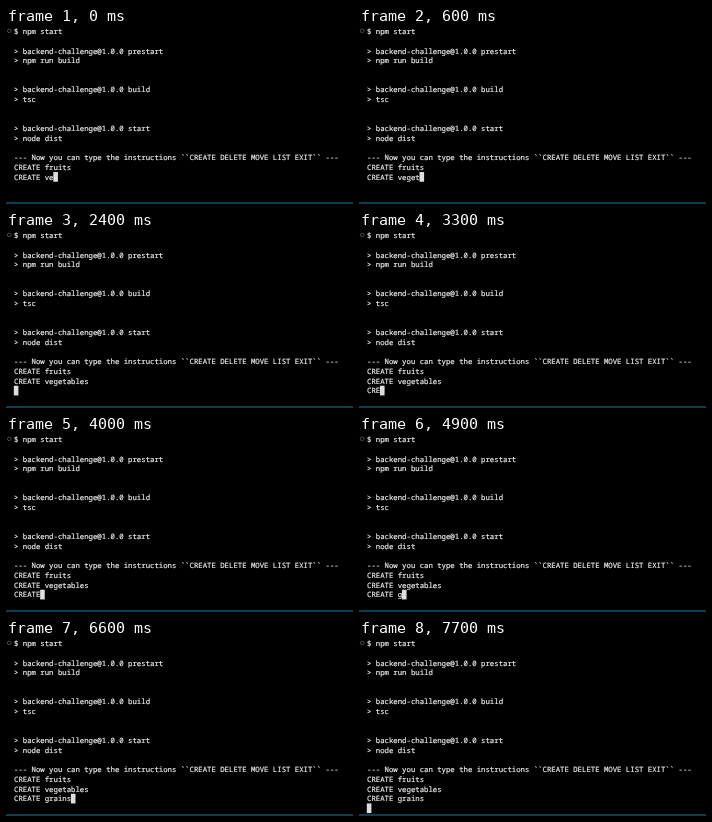
Animation of 347x176 px, one loop 8 s. Source, as an HTML page:

```html
<!DOCTYPE html>
<html lang="en">
<head>
<meta charset="utf-8">
<title>Terminal session</title>
<style>
  html, body { margin: 0; width: 100%; height: 100%; overflow: hidden; background: #000; }
  svg { display: block; }
  text {
    font: 7.32px "Noto Sans Mono", "DejaVu Sans Mono", monospace;
    fill: #ececec;
    stroke: #ececec;
    stroke-width: .2px;
    white-space: pre;
    text-rendering: geometricPrecision;
  }
</style>
</head>
<body>
<svg id="stage" width="347" height="176" viewBox="0 0 347 176">
  <rect width="347" height="176" fill="#000"/>
  <circle cx="3.2" cy="2.9" r="1.8" fill="none" stroke="#5c5c5c" stroke-width=".8"/>
  <rect y="174" width="347" height="2" fill="#083f52"/>
  <g id="lines"></g>
  <rect id="cursor" width="4.6" height="9.7" fill="#dedede"/>
</svg>
<script>
const LOOP = 8000;
const LEFT = 8, CELL = 4.392, ROW = 9.69, BASE = 6.3, TOP = -1.3;
const FIRST_INPUT = 14;

const output = [
  "$ npm start", "",
  "> backend-challenge@1.0.0 prestart", "> npm run build", "", "",
  "> backend-challenge@1.0.0 build", "> tsc", "", "",
  "> backend-challenge@1.0.0 start", "> node dist", "",
  "--- Now you can type the instructions ``CREATE DELETE MOVE LIST EXIT`` ---"
];

// Text already typed, then each key with its time
const typed = "CREATE fruits\nCREATE ve";
const keys = "getables\nCREATE grains\n";
const keyTimes = [
  200, 400, 600, 800, 1100, 1200, 1400, 1700, 2200,
  2900, 3100, 3300, 3500, 3700, 3900,
  4500, 4700, 5000, 5600, 6100, 6300, 6500, 7000
];

const lines = document.getElementById("lines");
const cursor = document.getElementById("cursor");

function addLine(row, content = "") {
  const node = document.createElementNS("http://www.w3.org/2000/svg", "text");
  node.setAttribute("x", LEFT);
  node.setAttribute("y", BASE + row * ROW);
  node.textContent = content;
  lines.append(node);
  return node;
}

output.forEach((content, row) => addLine(row, content));
const inputs = [0, 1, 2, 3].map(i => addLine(FIRST_INPUT + i));

let shown = -1;
function draw(t) {
  const count = keyTimes.filter(time => time <= t).length;
  if (count === shown) return;
  shown = count;
  const rows = (typed + keys.slice(0, count)).split("\n");
  const last = rows.length - 1;
  inputs.forEach((node, i) => { node.textContent = rows[i] || ""; });
  cursor.setAttribute("x", LEFT - 0.2 + rows[last].length * CELL);
  cursor.setAttribute("y", TOP + (FIRST_INPUT + last) * ROW);
}

const start = performance.now();
function tick() {
  draw((performance.now() - start) % LOOP);
  requestAnimationFrame(tick);
}
tick();
</script>
</body>
</html>
```
